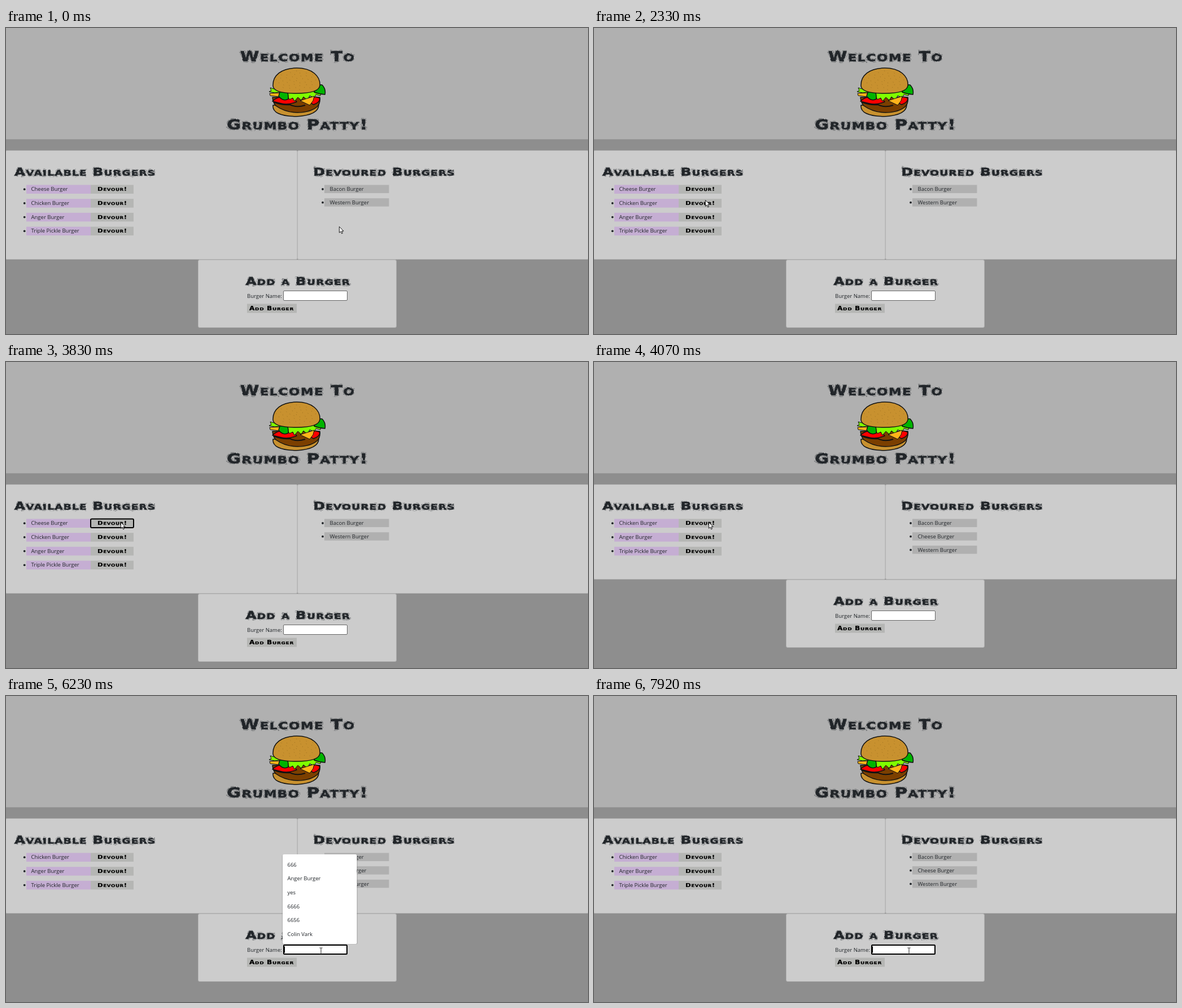
Write an HTML page that moves like this. It is 1031 px wide and 543 px high and loops after 8000 ms.

```html
<!DOCTYPE html>
<html lang="en">
<head>
<meta charset="utf-8">
<title>Burger list</title>
<style>
html, body { margin: 0; width: 100%; height: 100%; overflow: hidden; background: #8e8e8e; }
svg { display: block; width: 1031px; height: 543px; }
text { font: 9.5px "Open Sans", sans-serif; fill: #212529; }
.display { font-family: "DejaVu Sans", sans-serif; font-weight: bold; letter-spacing: .05em; }
.rough { filter: url(#rough); stroke: #212529; stroke-width: .5; }
.button { fill: #000; stroke: #000; stroke-width: .2; }
.card { fill: #ccc; stroke: #b2b2b2; }
.burger { stroke: #111; stroke-width: 1.5; stroke-linejoin: round; }
</style>
</head>
<body>
<svg viewBox="0 0 1031 543">
  <defs>
    <filter id="rough" x="-5%" y="-30%" width="110%" height="160%" color-interpolation-filters="sRGB">
      <feTurbulence type="fractalNoise" baseFrequency=".2" numOctaves="2" seed="4" result="noise"/>
      <feDisplacementMap in="SourceGraphic" in2="noise" scale="2" xChannelSelector="R" yChannelSelector="G" result="body"/>
      <feMorphology in="SourceGraphic" operator="dilate" radius=".6"/>
      <feComposite in2="SourceGraphic" operator="out"/>
      <feComponentTransfer><feFuncA type="linear" slope=".4"/></feComponentTransfer>
      <feDisplacementMap in2="noise" scale="6" xChannelSelector="G" yChannelSelector="R" result="scratch"/>
      <feMerge><feMergeNode in="scratch"/><feMergeNode in="body"/></feMerge>
    </filter>
  </defs>

  <rect width="1031" height="197.5" fill="#b0b0b0"/>
  <g class="burger">
    <path fill="#c8912f" d="M473 137Q471 156 514 157Q554 155 554 136Z"/>
    <path fill="#7b3f00" d="M472 123Q473 133 478 138Q495 150 516 150Q540 150 552 139Q557 133 556 123Z"/>
    <path fill="none" stroke-width="2" d="M475 132Q490 137 503 136Q515 142 530 137"/>
    <path fill="#f00" d="M472 130Q480 121 495 122Q510 123 515 131Q500 137 488 134ZM538 124Q550 120 556 125Q556 132 545 136Q538 134 538 124Z"/>
    <path fill="#7fff00" stroke-width="1" d="M480 105l-6 3-6-2 2 5-4 2 10 2 8-1 14 4 4 9 6-3 3 6 6-7 6 5 4-6 7 6 4-8 8 4 3-6 8 2 2-9Z"/>
    <path fill="#ffb31a" stroke-width="1" d="M467 116L485 115L484 122L468 120ZM521 129L546 121L544 129L538 137Z"/>
    <path fill="#00b400" d="M483 121Q486 106 496 107Q501 117 500 126Q491 131 483 121ZM546 114Q549 99 560 101Q567 108 565 118Q554 117 546 114Z"/>
    <path fill="#c8912f" d="M473 103C472 84 488 71 515 71C543 71 557 86 556 102C555 112 538 116 514 116C490 116 474 112 473 103Z"/>
    <g id="seeds" fill="none" stroke="#8f661c" stroke-width=".8"></g>
  </g>
  <g id="titles"></g>
  <g id="before"></g>
  <g id="after"></g>

  <g id="form">
    <rect class="card" x="340.5" y="411.5" width="351" height="120" rx="2.5"/>
    <g id="formTitle"></g>
    <text x="427" y="478.7">Burger Name:</text>
    <rect id="input" x="491.5" y="466.5" width="113" height="17" rx="1.5" fill="#fff" stroke="#666"/>
    <rect id="focus" x="492" y="467" width="112" height="16" rx="1.5" fill="none" stroke="#000" stroke-width="2"/>
    <text id="typed" x="493.5" y="479"></text>
    <path id="caret" stroke="#000" d="M0 469.5v11"/>
    <rect x="427" y="489.5" width="88" height="16" fill="#b5b6b4"/>
    <g id="formButton"></g>
  </g>

  <g id="menu">
    <rect x="489" y="281.5" width="134" height="159" rx="3" fill="#000" opacity=".14"/>
    <rect x="490" y="281" width="131.5" height="159" rx="2.5" fill="#fff"/>
  </g>
  <rect id="ring" x="150" y="278.5" width="76" height="15.5" rx="2" fill="none" stroke="#000" stroke-width="2"/>
  <path id="arrow" fill="#fff" stroke="#000" stroke-width=".9" d="M.4.5V11.2L2.9 9L4.7 12.8L6.4 12L4.7 8.3H8Z"/>
  <path id="beam" fill="none" stroke="#222" d="M-2.5-5H-.7L0-4.4L.7-5H2.5M0-4.4V4.9M-2.5 5.5H-.7L0 4.9L.7 5.5H2.5"/>
</svg>
<script>
const $ = id => document.getElementById(id);
const add = (id, markup) => $(id).insertAdjacentHTML('beforeend', markup);
const show = (id, on) => $(id).style.display = on ? '' : 'none';

const label = (x, y, s) => `<text x="${x}" y="${y}">${s}</text>`;
const box = (x, y, w, h, fill) => `<rect x="${x}" y="${y}" width="${w}" height="${h}" fill="${fill}"/>`;

// Wide display lettering with small capitals
function display(x, y, size, s, kind = 'rough') {
  const caps = s.replace(/[a-z]+/g, m => `<tspan font-size=".75em">${m.toUpperCase()}</tspan>`);
  const anchor = x === 516.5 ? 'middle' : 'start';
  return `<text class="display ${kind}" transform="translate(${x} ${y}) scale(1.25 1)"
    style="font-size:${size}px" text-anchor="${anchor}">${caps}</text>`;
}

function scene(id, bottom, ready, eaten) {
  const card = (x, w) => `<rect class="card" x="${x}" y="217.5" width="${w}" height="${bottom - 217.5}" rx="2"/>`;
  add(id, card(-.5, 516.5) + card(516.5, 515) +
    display(15, 262, 19.7, 'Available Burgers') + display(544.5, 262, 19.7, 'Devoured Burgers'));
  ready.forEach((name, i) => {
    const y = 286.2 + i * 24.7;
    add(id, `<circle cx="32.7" cy="${y}" r="1.9" fill="#212529"/>` +
      box(36, y - 7.7, 114, 15.5, '#c5aed3') + box(150, y - 7.7, 76, 15.5, '#b5b6b4') +
      label(44.5, y + 3.1, name) + display(162, y + 3.1, 9.3, 'Devour!', 'button'));
  });
  eaten.forEach((name, i) => {
    const y = 286 + i * 23.7;
    add(id, `<circle cx="561" cy="${y}" r="1.9" fill="#212529"/>` +
      box(564, y - 7.5, 114.5, 14.5, '#b0b0b0') + label(573.5, y + 3.2, name));
  });
}

const rest = ['Chicken Burger', 'Anger Burger', 'Triple Pickle Burger'];
scene('before', 410.5, ['Cheese Burger', ...rest], ['Bacon Burger', 'Western Burger']);
scene('after', 385.5, rest, ['Bacon Burger', 'Cheese Burger', 'Western Burger']);
add('titles', display(516.5, 59.3, 24.3, 'Welcome To') + display(516.5, 180, 24.3, 'Grumbo Patty!'));
add('formTitle', display(424.5, 456, 19.7, 'Add a Burger'));
add('formButton', display(431, 500.6, 9.7, 'Add Burger', 'button'));
['666', 'Anger Burger', 'yes', '6666', '6656', 'Colin Vark'].forEach((s, i) =>
  add('menu', label(498.5, 302.6 + i * 24.65, s)));

for (let i = 0; i < 40; i++) {
  const a = i * 2.4, r = Math.sqrt(i / 40);
  add('seeds', `<path d="M${514 + 37 * r * Math.cos(a)} ${93 + 18 * r * Math.sin(a)}l.9 .7"/>`);
}

// Pointer stops: time, x, y
const path = [
  [60, 590, 352], [530, 594, 338], [770, 594, 338], [1000, 606, 330], [1100, 612, 323],
  [1550, 312, 289], [1600, 312, 289], [1850, 240, 262], [2020, 208, 273], [2120, 208, 273],
  [2330, 197, 305], [2430, 197, 313], [2560, 197, 313], [2800, 195, 299], [2900, 195, 299],
  [3590, 202, 284], [3740, 203, 284], [4460, 203, 284], [4940, 552, 452], [5160, 558, 452]
];
function pointer(t) {
  const i = path.findIndex(p => p[0] > t);
  if (i < 1) return (i ? path[path.length - 1] : path[0]).slice(1);
  const [a, b] = [path[i - 1], path[i]], k = (t - a[0]) / (b[0] - a[0]);
  return [a[1] + (b[1] - a[1]) * k, a[2] + (b[2] - a[2]) * k];
}

const entries = [[7740, ''], [7580, 'T'], [7350, 'Te'], [6790, 'Ten'], [6460, 'T'], [0, '']];

function draw(t) {
  const eaten = t >= 4070, focus = t >= 5220;
  show('before', !eaten);
  show('after', eaten);
  show('ring', t >= 3740 && !eaten);
  $('form').setAttribute('transform', `translate(0 ${eaten ? -25 : 0})`);

  const [x, y] = pointer(t);
  const over = eaten && x > 491 && x < 605 && y > 441 && y < 459;
  show('arrow', !over);
  show('beam', over);
  $(over ? 'beam' : 'arrow').setAttribute('transform', `translate(${x} ${y})`);

  show('focus', focus);
  show('menu', focus && t < 6460);

  const typed = $('typed');
  typed.textContent = entries.find(e => t >= e[0])[1];
  const end = typed.textContent ? typed.getComputedTextLength() : 0;
  $('caret').setAttribute('transform', `translate(${Math.floor(493.5 + end) + .5} 0)`);
  show('caret', focus && !(t >= 5770 && t < 6230) && !(t >= 7420 && t < 7920));
}

const start = performance.now();
function tick() {
  draw((performance.now() - start) % 8000);
  requestAnimationFrame(tick);
}
tick();
</script>
</body>
</html>
```
